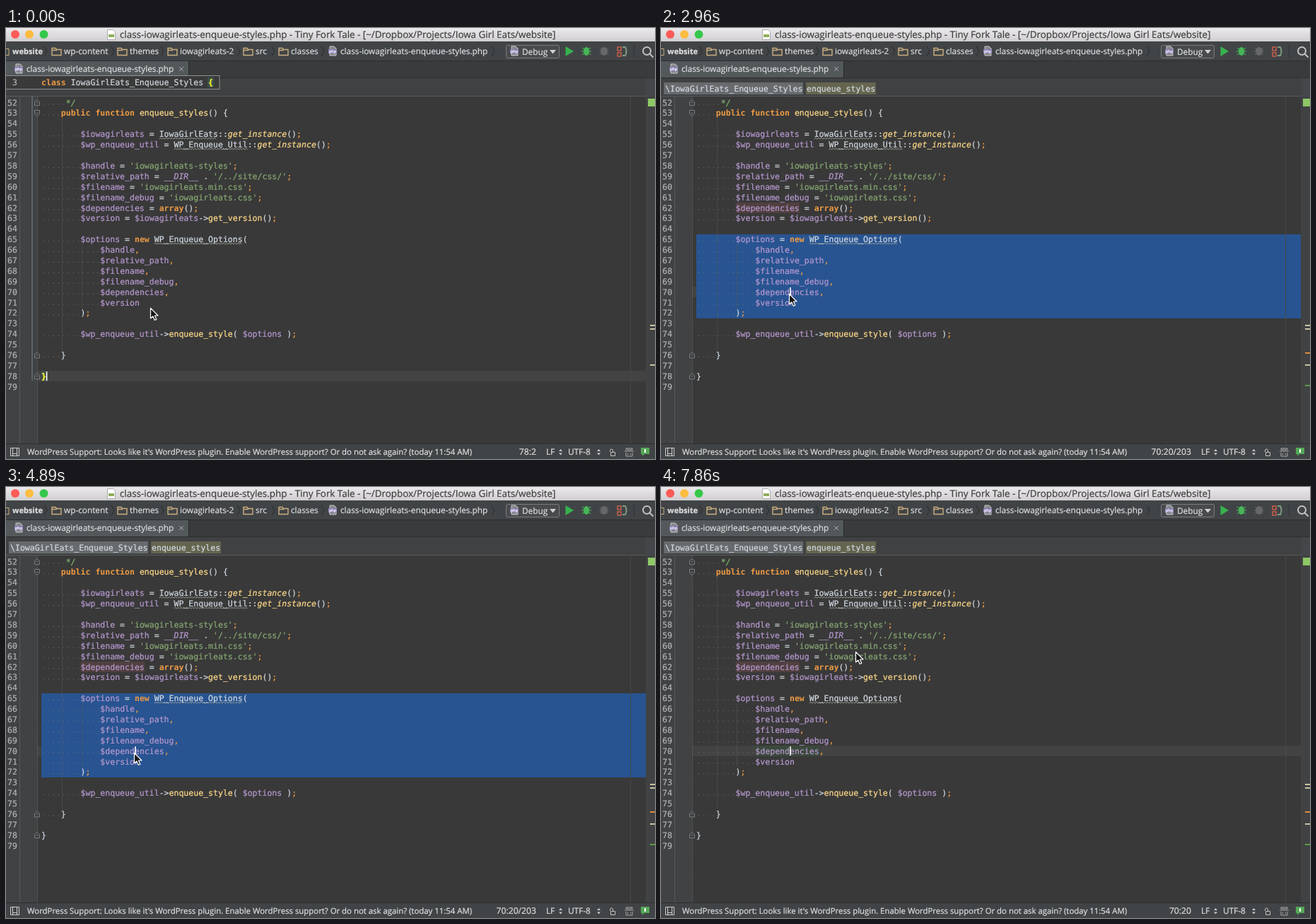
Write an HTML page that moves like this. It is 918 px wide and 610 px high and loops after 8 s.

```html
<!DOCTYPE html>
<html lang="en">
<head>
<meta charset="utf-8">
<title>Extend and shrink selection</title>
<style>
html, body { margin: 0; width: 100%; height: 100%; overflow: hidden; background: #393939; }
svg { display: block; width: 100vw; height: 100vh; text-rendering: geometricPrecision; }
text { white-space: pre; }
text, tspan { fill: currentColor; stroke: currentColor; stroke-width: .22px; }
.code { font: 11.54px "DejaVu Sans Mono", monospace; color: #d0d8e0; }
.num { color: #b0b3b6; }
.ui { font: 11.8px "Open Sans", sans-serif; color: #dcdee0; }
.key { color: #ee9b45; font-weight: bold; stroke-width: 0; }
.sep { color: #ee9b45; }
.var, .dir { color: #b698cf; }
.str { color: #86a872; }
.doc { color: #7db36e; font-style: italic; }
.fn, .stat { color: #ffd98a; }
.dir, .stat { font-style: italic; }
.brace { color: #ffef28; font-weight: bold; }
.line { fill: none; stroke: #a8aaac; }
</style>
</head>
<body>
<svg viewBox="0 0 918 610" id="stage"></svg>
<script>
const FIRST = 52, CHAR = 6.947, ROW = 14.89, LEFT = 50, RIGHT = 905;
const LOOP = 8000, BEAT = 148.3;
const FILE = 'class-iowagirleats-enqueue-styles.php';
const source = `     */
    public function enqueue_styles() {

        $iowagirleats = IowaGirlEats::get_instance();
        $wp_enqueue_util = WP_Enqueue_Util::get_instance();

        $handle = 'iowagirleats-styles';
        $relative_path = __DIR__ . '/../site/css/';
        $filename = 'iowagirleats.min.css';
        $filename_debug = 'iowagirleats.css';
        $dependencies = array();
        $version = $iowagirleats->get_version();

        $options = new WP_Enqueue_Options(
            $handle,
            $relative_path,
            $filename,
            $filename_debug,
            $dependencies,
            $version
        );

        $wp_enqueue_util->enqueue_style( $options );

    }

}
`.split('\n');

const colX = col => LEFT + col * CHAR;
const midY = line => 105.6 + (line - FIRST) * ROW;
const topY = line => midY(line) - ROW / 2;
const rect = (x, y, w, h, fill, more = '') =>
  `<rect x="${x}" y="${y}" width="${w}" height="${h}" fill="${fill}" ${more}/>`;
const path = (d, more = 'class="line"') => `<path d="${d}" ${more}/>`;
const text = (x, y, body, cls = 'ui', more = '') =>
  `<text x="${x}" y="${y}" class="${cls}" ${more}>${body}</text>`;
const cells = (line, from, to, fill, more) =>
  rect(colX(from), topY(line), (to - from) * CHAR, ROW, fill, more);

// Editor text
const kinds = ['doc', 'str', 'var', 'dir', 'key', 'cls', 'stat', 'fn', 'sep'];
const tokens = /(\*\/)|('[^']*')|(\$\w+)|(__DIR__)|\b(public|function|new|array)\b|([A-Z]\w+)|(get_instance)|(\w+(?=\())|([;,])/g;

function wave(line, col, length) {
  let d = `M${colX(col)} ${midY(line) + 7}`;
  for (let i = 0; i < length * CHAR / 4 - 1; i++) d += 'l2 -2l2 2';
  return path(d, 'fill="none" stroke="#a9aea3" stroke-width=".9"');
}

function codeLine(str, i) {
  const line = FIRST + i, y = midY(line), trimmed = str.trimStart();
  const indent = str.length - trimmed.length;
  let out = text(2, y + 4, line, 'code num'), waves = '';
  if (!trimmed) return out;
  const body = trimmed.replace(tokens, (m, ...groups) => {
    const kind = kinds[groups.findIndex(Boolean)];
    if (kind === 'cls') waves += wave(line, indent + groups[kinds.length], m.length);
    return `<tspan class="${kind}">${m}</tspan>`;
  });
  if (indent) out += path(`M${LEFT + 3} ${y + 2.5}H${colX(indent)}`,
    `fill="none" stroke="#747474" stroke-dasharray="1 ${CHAR - 1}"`);
  return out + text(colX(indent), y + 4, body, 'code') + waves;
}

const guide = (x, from, to) => path(`M${x} ${topY(from)}V${topY(to + 1)}`,
  'stroke="#585858" stroke-dasharray="1 1" fill="none"');

function fold(line, dir) {
  const y = midY(line);
  return path(`M40.5 ${y - 4 * dir}h7v${5 * dir}l-3.5 ${3 * dir}l-3.5 ${-3 * dir}zM42.5 ${y}h3`,
    'fill="#3c3d3e" stroke="#7c7e81"');
}

const stripe = (y, fill) => rect(911, y, 7, 2, fill);

// Window chrome
const folder = x => path(`M${x} 28.5h5l1.5 2h6.5v8h-13zM${x} 31.5h7`,
  'fill="none" stroke="#cbae80" stroke-width="1.4"');
const phpFile = (x, y) => path(`M${x + 2} ${y}h6l3 3v10h-9z`, 'fill="#85878a" stroke="#c8cacd"') +
  rect(x, y + 4, 12, 6, '#8b7fb5') + text(x + 1, y + 9, 'php', 'ui', 'style="font-size:5.5px;color:#fff"');
const chevron = x => path(`M${x} 26l4 7l-4 7`, 'fill="none" stroke="#2a2c2e"');
const spinner = x => path(`M${x} 599l2.5 -3l2.5 3zM${x} 601.5l2.5 3l2.5 -3z`, 'fill="#c8cacc"');
const disc = (x, fill) => `<circle cx="${x}" cy="9" r="6" fill="${fill}"/>`;
const crumbs = [[82, 'wp-content'], [175, 'themes'], [246, 'iowagirleats-2'], [353, 'src'], [403, 'classes']];

const chrome = [
  rect(0, 0, 918, 19, 'url(#bar)'), disc(13, '#fc5b57'), disc(33, '#fdbc40'), disc(53.5, '#34c84a'),
  path('M143.5 2.5h8l3 3v11h-11z', 'fill="#fff" stroke="#aaa"'), rect(145, 9, 8, 4, '#8fae5b'),
  text(161, 14, `${FILE} - Tiny Fork Tale - [~/Dropbox/Projects/Iowa Girl Eats/website]`, 'ui',
    'style="font-size:13.4px;color:#404040"'),
  rect(0, 19, 918, 28, '#414446'), rect(0, 46, 918, 1, '#2c2e30'),
  path('M0 29.5h4v9h-4', 'fill="none" stroke="#cbae80"'),
  text(9, 37, 'website', 'ui', 'style="font-weight:bold;font-size:11px"'),
  ...crumbs.map(([x, name]) => folder(x - 17) + text(x, 37, name)),
  ...[54, 149, 219, 327, 376, 446, 687].map(chevron),
  phpFile(456, 26), text(473, 37, FILE),
  rect(707.5, 24.5, 75, 18, '#484b4d', 'rx="2" stroke="#7a7c7e"'), phpFile(713, 26),
  text(730, 38, 'Debug'), path('M769 31h9l-4.5 5.5z', 'fill="#d0d2d4"'),
  path('M791.5 26v14l11.5 -7z', 'fill="#37b24d"'),
  path('M815 28l12 10M827 28l-12 10M814 33h14', 'stroke="#3f9c4d" stroke-width="1.5"'),
  '<ellipse cx="821" cy="33" rx="4" ry="6" fill="#47b658"/>',
  path('M840 28l12 10M852 28l-12 10M839 33h14', 'stroke="#666"'),
  '<ellipse cx="846" cy="33" rx="5" ry="6" fill="#66686a"/>',
  path('M865 27h5v5h-5zM865 35h5v5h-5z', 'fill="none" stroke="#c75f4b" stroke-width="1.5"'),
  path('M872 27h4q3 6 0 12h-4', 'fill="none" stroke="#7d9a82" stroke-width="2"'),
  rect(888, 24, 1, 18, '#303234'),
  path('M910.5 36.5l5 5M912 32.5a5.5 5.5 0 1 1 -11 0a5.5 5.5 0 1 1 11 0',
    'fill="none" stroke="#c0c2c4" stroke-width="2"'),
  rect(0, 47, 918, 24, '#393b3d'), rect(0, 47, 258, 24, '#53585a'), rect(258, 47, 1, 24, '#292b2d'),
  phpFile(12, 51), text(29, 62, FILE), path('M245 55l6 6M251 55l-6 6'),
  rect(0, 70, 918, 1, '#2c2e30'), rect(0, 71, 918, 26, '#3f4143'), rect(905, 71, 13, 26, '#444749'),
  path('M0 96.5H905', 'stroke="#717273" stroke-dasharray="1 1"'),
  rect(0, 588, 918, 22, '#414446'), rect(0, 588, 918, 1, '#2c2e30'),
  path('M6.5 594.5h12v11h-12zM9.5 594v12M15.5 594v12M10 602.5h5', 'fill="none" stroke="#ccced0"'),
  text(30, 604, "WordPress Support: Looks like it's WordPress plugin. Enable WordPress support? Or do not ask again? (today 11:54 AM)",
    'ui', 'style="font-size:11.385px"'),
  text(764, 604, 'LF'), spinner(782), text(795, 604, 'UTF-8'), spinner(836),
  path('M854.5 600v-2a2 2 0 0 1 4 0v2M855.5 600.5h6v5h-6z', 'fill="none" stroke="#c0c2c4"'),
  path('M877 597h9v-2h-9zM875 599h13M877 601v5h9v-5M879.5 602v2M883.5 602v2'),
  path('M898 594h12v9h-7l-3 3v-3h-2z', 'fill="#54a857"'), rect(903, 596, 2, 5, '#fff')
].join('');

const crumbPanel =
  rect(4, 77, 197, 17, '#686b6d') + text(6, 90, '\\IowaGirlEats_Enqueue_Styles', 'code') +
  rect(205, 77, 99, 17, '#65654f') + text(206, 90, 'enqueue_styles', 'code');

const classHint =
  rect(-1, 67.5, 303, 19, '#3a3a3a', 'stroke="#8f8f8f"') + text(9, 81, '3', 'code num') +
  rect(285, 70, 9, 14, '#3b514d') +
  text(50, 81, '<tspan class="key">class</tspan> IowaGirlEats_Enqueue_Styles <tspan class="brace">{</tspan>', 'code');

const stage = document.getElementById('stage');
stage.innerHTML = `
<defs><linearGradient id="bar" x2="0" y2="1"><stop stop-color="#ebe9eb"/><stop offset="1" stop-color="#d0ced0"/></linearGradient></defs>
${rect(0, 0, 918, 610, '#393939')}
<g id="currentRow">${rect(44, 0, RIGHT - 44, ROW, '#434343')}</g>
<g id="usages">${cells(62, 8, 21, '#514040')}${cells(70, 12, 25, '#3b4a3c')}</g>
<path id="selection" fill="#285491" shape-rendering="crispEdges"/>
${rect(883, 97, 1, 491, '#494949')}
${rect(0, 97, 44, 491, '#404243')}${rect(19, 97, 1, 491, '#56585a')}
${path('M44.5 97V588', 'stroke="#666768" stroke-dasharray="1 1"')}
<g id="scope">${rect(36, 97, 2, 402, '#59666c')}${cells(78, 0, 1, '#3b514d')}</g>
${guide(79.5, 54, 75)}${guide(107.5, 66, 71)}
${source.map(codeLine).join('')}
<g id="match">${text(LEFT, midY(78) + 4, '}', 'code brace')}</g>
${fold(52, -1)}${fold(53, 1)}${fold(76, -1)}${fold(78, -1)}
${rect(RIGHT, 97, 13, 491, '#404243')}${rect(908, 100, 10, 11, '#8fc866')}
${stripe(420, '#c8c3a0')}${stripe(425, '#c8c3a0')}${stripe(476, '#c8c3a0')}
<g id="marks">${stripe(459, '#e08b40')}${stripe(505, '#5f9c48')}</g>
<g id="caret">${rect(0, 0, 1.6, 13, '#fff')}</g>
${chrome}
<g id="crumbPanel">${crumbPanel}</g><g id="hint">${classHint}</g>
${text(750, 604, '', 'ui', 'id="position" text-anchor="end" style="font-size:12.2px"')}
<g id="mouse">${path('M0 0V14.5L3.4 11.5L5.8 17L8.3 16L6 10.5H10.5Z',
  'fill="#151515" stroke="#fff" stroke-width="1.2" stroke-linejoin="round"')}</g>`;

const el = Object.fromEntries([...stage.querySelectorAll('[id]')].map(e => [e.id, e]));
const show = (e, on) => e.setAttribute('visibility', on ? 'visible' : 'hidden');
const move = (e, x, y) => e.setAttribute('transform', `translate(${x} ${y})`);

// Nested ranges: start line, column, end line, column (none = with line break)
const ranges = [
  null, [70, 13, 70, 25], [70, 12, 70, 25], [66, 0, 71], [65, 19, 72, 9], [65, 0, 72, 9],
  [65, 0, 72], [54, 0, 75], [53, 37, 76], [53, 0, 76]
];
const grow = [11, 12, 14, 16, 18, 20, 22, 23, 25];
const shrink = [31, 32, 33, 35, 37, 39, 41, 42, 44];

function select(range) {
  let d = '', count = 0;
  if (range) {
    const [first, from, last, to] = range;
    for (let n = first; n <= last; n++) {
      const start = n === first ? from : 0, end = n === last ? to : undefined;
      count += (end ?? source[n - FIRST].length + 1) - start;
      d += `M${colX(start)} ${topY(n)}H${end === undefined ? RIGHT : colX(end)}V${topY(n + 1)}H${colX(start)}z`;
    }
  }
  el.selection.setAttribute('d', d);
  return count;
}

const smooth = v => { v = Math.min(1, Math.max(0, v)); return v * v * (3 - 2 * v); };

function draw(now) {
  const beat = Math.floor((now % LOOP + 13) / BEAT), time = beat * BEAT;
  const clicked = beat >= 5;
  const passed = list => list.filter(b => b <= beat).length;

  const count = select(ranges[passed(grow) - passed(shrink)]);
  el.position.textContent = (clicked ? '70:20' : '78:2') + (count ? '/' + count : '');

  const row = clicked ? 70 : 78;
  move(el.currentRow, 0, topY(row));
  move(el.caret, clicked ? 182.2 : 56.8, midY(row) - 6.5);
  show(el.caret, !clicked || Math.floor((time - 604) / 508) % 2 === 0);
  for (const e of [el.hint, el.scope, el.match]) show(e, !clicked);
  show(el.crumbPanel, beat >= 6);
  show(el.usages, beat >= 8);
  show(el.marks, beat >= 8);

  const toWord = smooth(beat / 4), away = smooth((beat - 48) / 5);
  move(el.mouse, 204.5 - 23 * toWord + 94 * away, 396.5 - 20 * toWord - 143 * away);
}

function tick() {
  draw(performance.now());
  requestAnimationFrame(tick);
}
tick();
</script>
</body>
</html>
```
